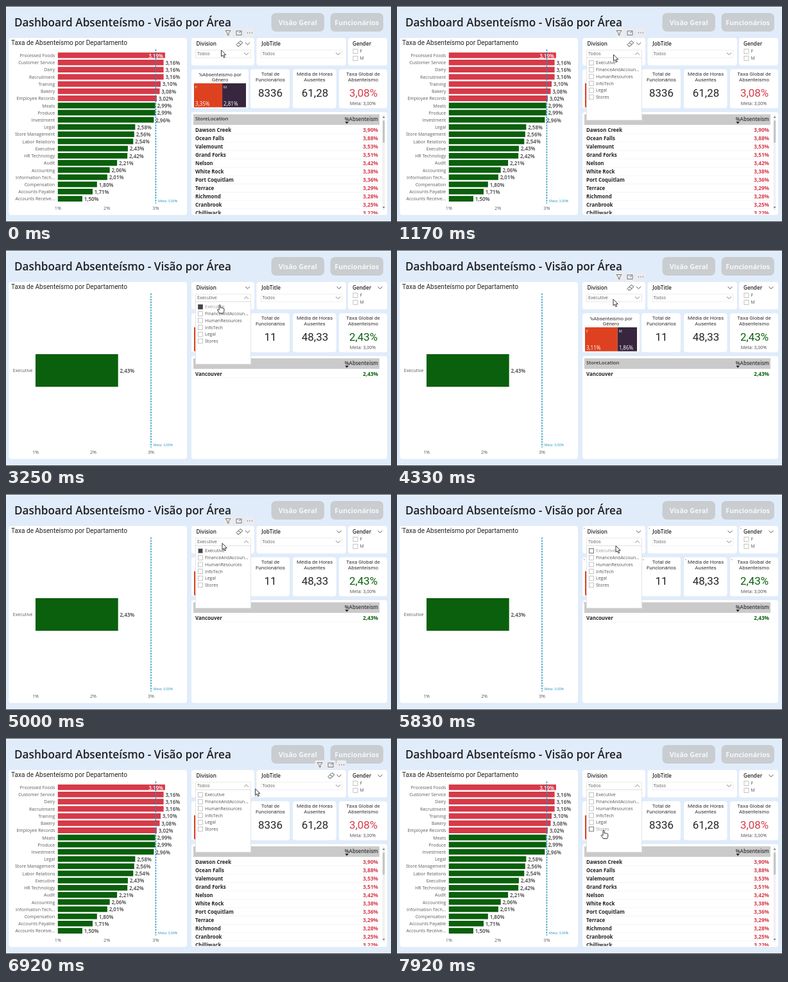
These frames come from a looping animation (600 by 338 pixels, 8 s). An HTML page with a canvas:

```html
<!DOCTYPE html>
<html lang="pt">
<head>
<meta charset="utf-8">
<title>Dashboard Absenteísmo</title>
<style>
html, body { margin: 0; width: 100%; height: 100%; overflow: hidden; background: #e1ecfa; }
canvas { display: block; }
</style>
</head>
<body>
<canvas id="stage" width="600" height="338"></canvas>
<script>
const ctx = document.getElementById('stage').getContext('2d');
const LOOP = 8000;
const RED = '#d63a49', GREEN = '#0a600c', INK = '#252423', GREY = '#5c5c5c', BLUE = '#1f93bd';
const SANS = '"Open Sans", sans-serif', DIN = 'Roboto, sans-serif';

const departments = [
  ['Processed Foods', 3.19], ['Customer Service', 3.16], ['Dairy', 3.16], ['Recruitment', 3.16],
  ['Training', 3.10], ['Bakery', 3.08], ['Employee Records', 3.02], ['Meats', 2.99],
  ['Produce', 2.99], ['Investment', 2.96], ['Legal', 2.58], ['Store Management', 2.56],
  ['Labor Relations', 2.54], ['Executive', 2.43], ['HR Technology', 2.42], ['Audit', 2.21],
  ['Accounting', 2.06], ['Information Tech...', 2.01], ['Compensation', 1.80],
  ['Accounts Payable', 1.71], ['Accounts Receive...', 1.50]
];
const stores = [
  ['Dawson Creek', 3.90], ['Ocean Falls', 3.88], ['Valemount', 3.53], ['Grand Forks', 3.51],
  ['Nelson', 3.42], ['White Rock', 3.38], ['Port Coquitlam', 3.36], ['Terrace', 3.29],
  ['Richmond', 3.28], ['Cranbrook', 3.25], ['Chilliwack', 3.22]
];
const divisions = ['Executive', 'FinanceAndAccoun...', 'HumanResources', 'InfoTech', 'Legal', 'Stores'];
const allData = { bars: departments, rows: stores, staff: '8336', hours: '61,28', rate: 3.08, women: 3.35, men: 2.81,
  axis: 80.8, unit: 76.3, top: 72.8, pitch: 11.22, thick: 8.8 };
const executiveData = { bars: [['Executive', 2.43]], rows: [['Vancouver', 2.43]], staff: '11', hours: '48,33', rate: 2.43,
  women: 3.11, men: 1.86, axis: 46, unit: 90, top: 163, pitch: 51, thick: 51 };

// time, x, y of the pointer tip
const path = [
  [0, 335.5, 69], [500, 335.5, 69], [800, 337.5, 76], [1650, 337.5, 76], [2100, 332, 88], [3000, 332, 88],
  [3800, 337, 77], [5050, 337, 77], [5400, 341, 81], [6250, 341, 81], [6750, 388.7, 79.5], [7150, 388.7, 79.5],
  [7800, 322, 144], [8000, 322, 144]
];

const within = (t, from, to) => t >= from && t < to;
const percent = v => v.toFixed(2).replace('.', ',') + '%';
const rateColor = v => v > 3 ? RED : GREEN;

function rect(x, y, w, h, fill, radius = 0) {
  ctx.fillStyle = fill;
  ctx.beginPath();
  ctx.roundRect(x, y, w, h, radius);
  ctx.fill();
}

function frame(x, y, w, h, color, width = 0.8) {
  ctx.strokeStyle = color;
  ctx.lineWidth = width;
  ctx.strokeRect(x, y, w, h);
}

function line(points, color, width = 1) {
  ctx.strokeStyle = color;
  ctx.lineWidth = width;
  ctx.beginPath();
  points.forEach(([x, y]) => ctx.lineTo(x, y));
  ctx.stroke();
}

function triangle(x, y, halfWidth, height, fill) {
  ctx.fillStyle = fill;
  ctx.beginPath();
  ctx.moveTo(x - halfWidth, y);
  ctx.lineTo(x + halfWidth, y);
  ctx.lineTo(x, y + height);
  ctx.fill();
}

// y is the middle of the capital letters
function text(s, x, y, size, color = INK, align = 'left', weight = 400, font = SANS) {
  ctx.font = `${weight} ${size}px ${font}`;
  ctx.textAlign = align;
  ctx.fillStyle = color;
  ctx.fillText(s, x, y + size * 0.357);
}

function chevron(x, y, up = false, color = '#777') {
  const d = up ? -1.7 : 1.7;
  line([[x - 3.5, y - d], [x, y + d], [x + 3.5, y - d]], color, 0.9);
}

function button(x, w, label) {
  rect(x, 11, w, 29, '#c9cdd0', 7);
  text(label, x + w / 2, 26, 10.7, '#f3f8fe', 'center', 700);
}

function hoverTools(x, eraserX) {
  for (const dx of [0, 17, 34]) rect(x + dx - 7.5, 35, 15, 14, '#eaecf0', 2);
  line([[x - 4, 38.5], [x + 4, 38.5], [x + 1, 42.5], [x + 1, 46], [x - 1, 45], [x - 1, 42.5], [x - 4, 38.5]], GREY, 0.8);
  frame(x + 13, 39, 8, 6.5, GREY);
  line([[x + 17, 42], [x + 20, 40]], GREY, 0.8);
  for (const dx of [30.5, 34, 37.5]) rect(x + dx - 0.7, 41.3, 1.4, 1.4, GREY, 0.7);
  line([[eraserX - 5, 60.5], [eraserX + 1, 54.5], [eraserX + 5, 57.5], [eraserX - 1, 63], [eraserX - 3, 63], [eraserX - 5, 60.5]], '#444', 0.9);
  line([[eraserX - 2, 57.5], [eraserX + 2, 60.5]], '#444', 0.9);
}

function checkbox(y, x, label, hover, checked) {
  if (checked) rect(x, y - 3.5, 7, 7, '#444');
  frame(x, y - 3.5, 7, 7, hover ? '#555' : '#b5b5b5');
  text(label, x + 10.5, y, 7, hover ? '#999' : '#555');
}

function drawChart(data) {
  const at = v => data.axis + (v - 1) * data.unit;
  text('Taxa de Absenteísmo por Departamento', 8, 57.5, 10.1, INK, 'left', 400, DIN);
  for (const v of [1, 2, 3]) text(v + '%', at(v), 316.8, 7.3, GREY, 'center');
  const middle = i => data.top + i * data.pitch + data.thick / 2;
  data.bars.forEach(([name, v], i) => {
    rect(data.axis, data.top + i * data.pitch, at(v) - data.axis, data.thick, rateColor(v));
    text(name, data.axis - 4.5, middle(i) + 0.3, 7, GREY, 'right');
  });
  ctx.setLineDash([2.6, 1.6]);
  line([[at(3), 68], [at(3), 309]], BLUE, 1.5);
  ctx.setLineDash([]);
  text('Meta: 3,00%', at(3) + 3.7, 305.5, 5.3, BLUE);
  data.bars.forEach(([, v], i) => {
    const inside = v > 3.18;
    text(percent(v), at(v) + (inside ? -3 : 2.8), middle(i) + 0.5, 8, inside ? '#fff' : '#3c3c3c', inside ? 'right' : 'left', 600);
  });
}

function drawCards(data) {
  const heading = (s, x, y) => text(s, x, y, 8, '#333', 'center', 400, DIN);
  const value = (s, x, color) => text(s, x, 136, 16.9, color, 'center', 400, DIN);
  heading('%Absenteísmo por', 333.5, 107);
  heading('Gênero', 333.5, 115);
  const split = 81 * data.women / (data.women + data.men);
  rect(293, 121, split, 37.5, '#de4120');
  rect(293 + split, 121, 81 - split, 37.5, '#38263e');
  [['F', data.women, 295], ['M', data.men, 295 + split]].forEach(([sex, v, x]) => {
    text(sex, x, 127.5, 5.5, '#fff');
    text(percent(v), x, 153, 8.1, '#fff');
  });
  heading('Total de', 412, 106.6);
  heading('Funcionários', 412, 115);
  value(data.staff, 412, INK);
  heading('Média de Horas', 481, 106.6);
  heading('Ausentes', 481, 115);
  value(data.hours, 481.5, INK);
  heading('Taxa Global de', 556.5, 106.6);
  heading('Absenteísmo', 556.5, 115);
  value(percent(data.rate), 557, rateColor(data.rate));
  text('Meta: 3,00%', 556, 152, 7.1, '#4a4a4a', 'center');
}

function drawTable(data) {
  rect(292, 169.5, 290, 16.5, '#cacaca');
  text('StoreLocation', 295, 176.7, 7.7, '#333', 'left', 600);
  text('%Absenteism', 580, 176.7, 8, '#333', 'right', 600);
  triangle(531.2, 181, 2.8, 3.5, INK);
  ctx.save();
  ctx.beginPath();
  ctx.rect(289, 186, 305, 139.5);
  ctx.clip();
  data.rows.forEach(([name, v], i) => {
    const y = 193.7 + i * 13.06;
    text(name, 295, y, 7.9, INK, 'left', 700);
    text(percent(v), 580, y, 8.2, rateColor(v), 'right', 700);
    rect(292, y + 6, 290, 0.6, '#efefef');
  });
  ctx.restore();
  if (data.rows.length > 1) {
    rect(586.5, 170, 4, 150, '#f1f1f1', 2);
    rect(587, 179, 3.2, 35, '#c4c4c4', 1.6);
    triangle(588.6, 175, 2, -2.5, '#777');
    triangle(588.6, 314, 2, 2.5, '#777');
  }
}

function drawSlicers(t, selected, open) {
  text('Division', 296.5, 59, 8.2, INK, 'left', 600);
  text('JobTitle', 398.3, 59, 8.2, INK, 'left', 600);
  text('Gender', 540, 59, 8.2, INK, 'left', 600);
  frame(295.5, 69, 86, 12, '#e2e2e2');
  frame(397.5, 69, 126.5, 12, '#ececec');
  text(selected ? 'Executive' : 'Todos', 298, 75, 7, GREY);
  text('Todos', 399.5, 75, 7, GREY);
  chevron(374.5, 74.8, open);
  chevron(517.5, 74.8);
  checkbox(71, 541, 'F');
  checkbox(82, 541, 'M');
  if (t < 6050) chevron(376.5, 59, false, '#444');
  if (within(t, 2330, 7200)) chevron(519, 59, false, '#444');
  if (t >= 2330) chevron(583, 59, false, '#444');
}

function drawMenu(selected, [x, y]) {
  rect(295, 81, 87, 98, '#fff');
  frame(295.5, 81, 86, 97.5, '#dcdcdc');
  divisions.forEach((name, i) => {
    const rowY = 89 + i * 10.7;
    const hover = x < 382 && Math.abs(y - rowY) < (i ? 5.35 : 8.5);
    checkbox(rowY, 299.5, name, hover, selected && i === 0);
  });
}

function pointerAt(t) {
  const i = path.findIndex(p => p[0] > t);
  const [t0, x0, y0] = path[i - 1], [t1, x1, y1] = path[i];
  const u = (t - t0) / (t1 - t0), e = u * u * (3 - 2 * u);
  return [x0 + (x1 - x0) * e, y0 + (y1 - y0) * e];
}

const arrow = new Path2D('M0 0V10L2.3 8L4 11.8L5.7 11L4.1 7.4H7.2Z');
const hand = new Path2D('M-1 1Q0-.6 1 1V5Q2 4 3 5.2Q4 4.4 5 5.7Q6.5 5.2 6.8 6.8V10L5.5 13.5H-.5L-3.8 8.5Q-3.5 6.8-1 8.5Z');

function drawPointer([x, y], overItem) {
  const shape = overItem ? hand : arrow;
  ctx.save();
  ctx.translate(x, y);
  ctx.fillStyle = '#fff';
  ctx.strokeStyle = '#222';
  ctx.lineWidth = 0.9;
  ctx.fill(shape);
  ctx.stroke(shape);
  ctx.restore();
}

const cards = [
  [4.5, 50, 277.5, 277], [289, 50, 98, 43], [390.5, 50, 139.5, 43], [533, 50, 61, 43], [289, 99, 89, 61],
  [381, 99, 61, 61], [447, 99, 67.5, 61], [519, 99, 75, 61], [289, 166, 305, 161]
];

function draw(t) {
  const open = within(t, 850, 3900) || t >= 5000;
  const selected = within(t, 2250, 5600);
  const data = within(t, 2330, 6000) ? executiveData : allData;
  const loading = within(t, 2250, 2330) || within(t, 5600, 6000);
  const pointer = pointerAt(t);

  rect(0, 0, 600, 338, '#e1ecfa');
  rect(0, 0, 600, 1, '#555');
  rect(0, 337, 600, 1, '#444');
  text('Dashboard Absenteísmo - Visão por Área', 13, 26, 17.2, '#1f1f24', 'left', 600);
  button(413.5, 82.5, 'Visão Geral');
  button(505.5, 82.5, 'Funcionários');
  cards.forEach(([x, y, w, h]) => {
    rect(x, y, w, h, '#fff', 4);
    if (loading) rect(x + 2, y + 3, 1.5, 1.5, '#888', 0.75);
  });
  drawChart(data);
  drawCards(data);
  drawTable(data);
  drawSlicers(t, selected, open);
  if (within(t, 0, 1950) || within(t, 3800, 5350)) hoverTools(346, 364);
  if (within(t, 6650, 7250)) hoverTools(489, 507);
  if (open) drawMenu(selected, pointer);
  drawPointer(pointer, open && pointer[0] < 382 && pointer[1] > 83);
}

function tick(now) {
  draw(now % LOOP);
  requestAnimationFrame(tick);
}
requestAnimationFrame(tick);
</script>
</body>
</html>
```
